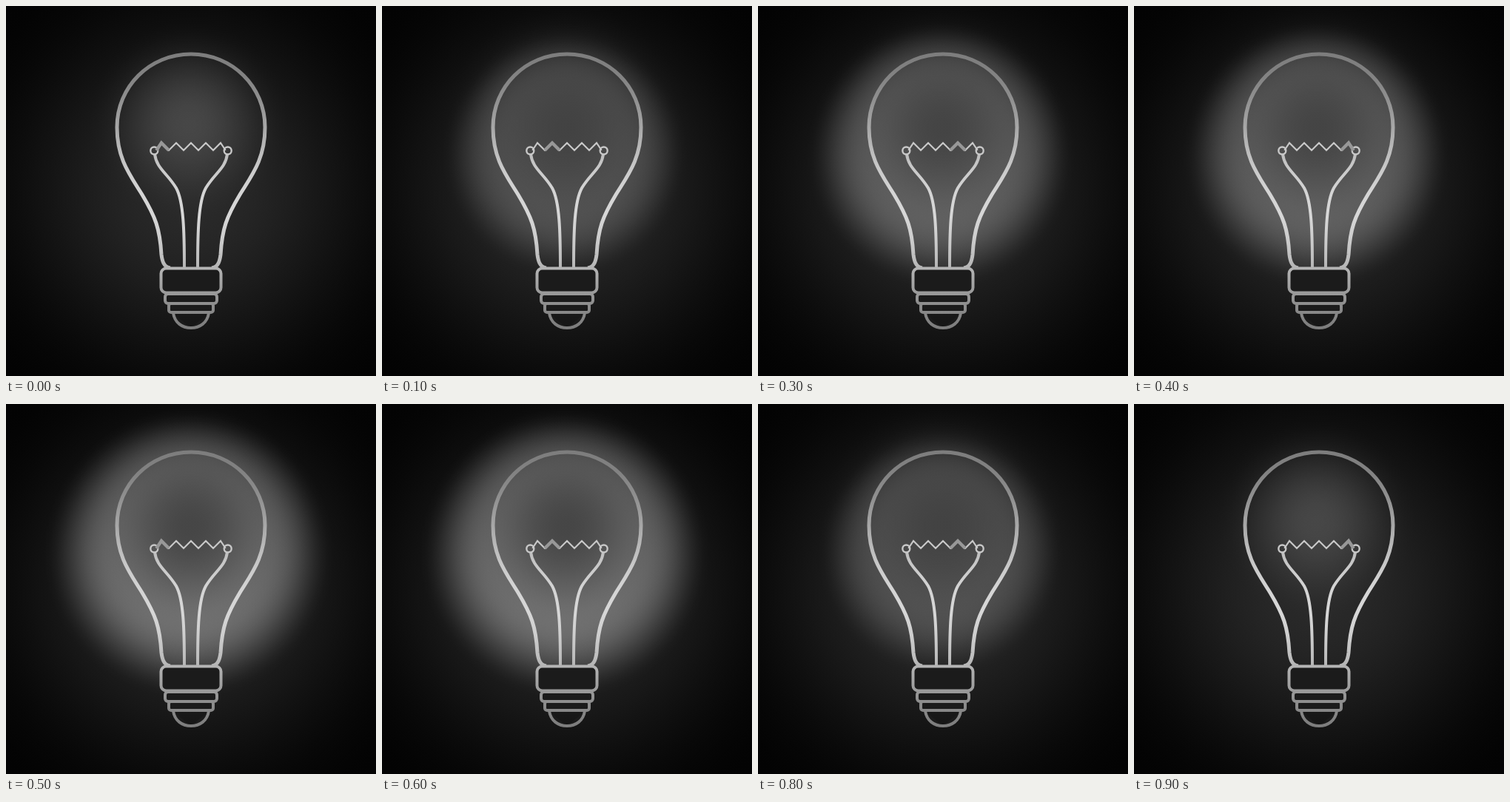
An HTML page with a canvas that plays this animation: 500 px wide and 500 px high, repeating every 1000 ms.

```html
<!DOCTYPE html>
<html lang="en">
<head>
<meta charset="utf-8">
<title>Light bulb</title>
<style>
html, body { margin: 0; width: 100%; height: 100%; overflow: hidden; background: #030303; }
canvas { display: block; width: 500px; height: 500px; }
</style>
</head>
<body>
<canvas id="stage" width="500" height="500"></canvas>
<script>
const SIZE = 500, MID = SIZE / 2;
const STEP = 100, STEPS = 10;
const PEAKS = 5, PITCH = 20;
const RING_Y = 195.5, RING_DX = 49.7;
const ctx = document.getElementById('stage').getContext('2d');

const gray = (v, a = 1) => `rgba(${v},${v},${v},${a})`;

// Right half of the bulb drawing; the left half mirrors it around x = 0.
const half = {
  glass: 'M0 65C56 65 100 109 100 164C100 207 82 229 66 255C48 285 42 301 40 336C39 344 37 353 28 354',
  wire: 'M49 200C47 219 32 226 20 246C10 264 9 305 9 353',
  dome: 'M24 415C22 428 12 435 0 435'
};

function mirrored(data) {
  const side = new Path2D(data), both = new Path2D();
  [1, -1].forEach(s => both.addPath(side, new DOMMatrix([s, 0, 0, 1, MID, 0])));
  return both;
}

function stroke(c, path, width, style) {
  c.lineWidth = width;
  c.strokeStyle = style;
  c.stroke(path);
}

// Round glow with a cosine falloff; a higher power gives a flatter middle.
function glow(c, x, y, r, tone, alpha, power = 1) {
  const g = c.createRadialGradient(x, y, 0, x, y, r), n = 24;
  for (let i = 0; i <= n; i++) {
    const t = i / n;
    g.addColorStop(t, gray(tone, alpha * Math.cos(t ** power * Math.PI / 2) ** 2));
  }
  c.fillStyle = g;
  c.fillRect(0, 0, SIZE, SIZE);
}

// Metal is brightest at the neck and darker towards both ends.
function metalStyle(c) {
  const top = 64, height = 372, n = 12;
  const g = c.createLinearGradient(0, top, 0, top + height);
  for (let i = 0; i <= n; i++) {
    const t = i / n;
    g.addColorStop(t, gray(Math.round(125 + 90 * Math.sin(Math.PI * t ** 1.2) ** 1.5)));
  }
  return g;
}

function drawSocket(c, metal) {
  c.fillStyle = gray(27);
  const dome = mirrored(half.dome);
  c.fill(dome);
  stroke(c, dome, 4, metal);
  [[30, 402, 12, 3], [35, 389, 13, 4], [40.5, 354.5, 33, 7]].forEach(([w, y, h, r]) => {
    const box = new Path2D();
    box.roundRect(MID - w, y, 2 * w, h, r);
    c.fill(box);
    stroke(c, box, 4, metal);
  });
}

const peakX = i => MID + (i - (PEAKS - 1) / 2) * PITCH;

// Zigzag over the peaks from first to last, ending in the rings at the sides.
function coil(first, last) {
  const path = new Path2D();
  const valley = x => path.lineTo(
    MID + Math.max(-RING_DX + 3, Math.min(RING_DX - 3, x - MID)), 195);
  valley(peakX(first) - PITCH / 2);
  for (let i = first; i <= last; i++) {
    path.lineTo(peakX(i), 185);
    valley(peakX(i) + PITCH / 2);
  }
  return path;
}

function buildScene(level) {
  const layer = document.createElement('canvas');
  layer.width = layer.height = SIZE;
  const c = layer.getContext('2d');
  c.fillStyle = gray(3);
  c.fillRect(0, 0, SIZE, SIZE);
  glow(c, MID, MID, 354, 42, 1);
  glow(c, 247, 155, 135, 92, 0.62);
  if (level) {
    glow(c, 247, 202, 151 + 15 * level, 73 + 19 * level, 0.95, 2.2);
    glow(c, 249, 165, 170, 64, 0.9);
  }

  const metal = metalStyle(c);
  stroke(c, mirrored(half.glass), 5, metal);
  stroke(c, mirrored(half.wire), 4, metal);
  drawSocket(c, metal);
  stroke(c, coil(0, PEAKS - 1), 2.2, gray(200));
  [-1, 1].forEach(side => {
    const ring = new Path2D();
    ring.arc(MID + side * RING_DX, RING_Y, 5, 0, Math.PI * 2);
    stroke(c, ring, 2.4, gray(200));
  });
  return layer;
}

const scenes = Array.from({ length: 4 }, (_, level) => buildScene(level));

// The light rises every second step and fades on every step.
const levelAt = step => Math.min(Math.ceil(step / 2), STEPS - 1 - step);

function draw(time) {
  const step = Math.floor(time / STEP) % STEPS;
  const peak = step % PEAKS;
  ctx.drawImage(scenes[levelAt(step)], 0, 0);
  stroke(ctx, coil(peak, peak), 4.4, gray(152));
}

const start = performance.now();
function loop() {
  draw(performance.now() - start);
  requestAnimationFrame(loop);
}
loop();
</script>
</body>
</html>
```
